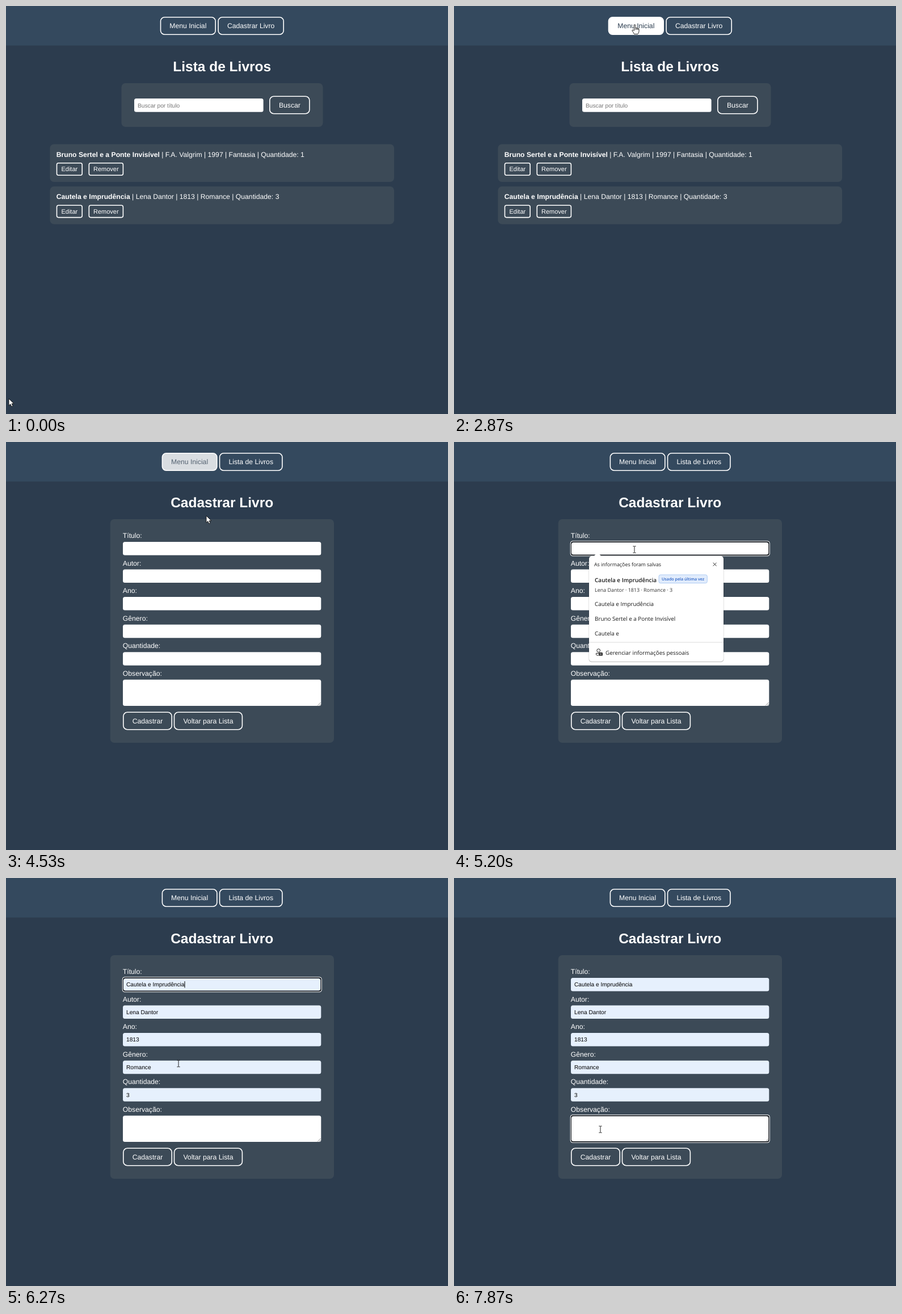
Animation of 779 by 719 pixels, one loop 8 s. Source, as an HTML page:

```html
<!DOCTYPE html>
<html lang="pt-BR">
<head>
<meta charset="utf-8">
<title>Lista de Livros</title>
<style>
html, body { margin: 0; width: 100%; height: 100%; overflow: hidden; background: #2c3c4e; }
svg { display: block; width: 779px; height: 719px; }
text { font-family: Arial, "Liberation Sans", sans-serif; text-rendering: geometricPrecision; white-space: pre; }
.ui { font-family: "Open Sans", "Noto Sans", sans-serif; }
</style>
</head>
<body>
<svg id="stage" viewBox="0 0 779 719"></svg>
<script>
const LOOP = 8000, FPS = 15;
const PAGE = '#2c3c4e', NAV = '#34495e', CARD = '#3c4a57', FILLED = '#e6f0fd';
const HOME_AT = 2933, FORM_AT = 4067, FOCUS_AT = 5000, POPUP_AT = 5130, PREVIEW_AT = 5530,
      PICK_AT = 6066, NOTE_AT = 7330, CARET_OFF = 7860;

const books = [
  { title: 'Bruno Sertel e a Ponte Invisível', author: 'F.A. Valgrim', year: 1997, genre: 'Fantasia', count: 1 },
  { title: 'Cautela e Imprudência', author: 'Lena Dantor', year: 1813, genre: 'Romance', count: 3 }
];
const pick = books[1];

// Pointer path: time, x, y
const path = [
  [0, 5, 692], [66, 5, 692], [866, 315, 21], [1150, 315, 21], [1333, 319, 33],
  [3130, 319, 33], [3600, 337, 91], [3670, 339, 90], [3930, 352, 38], [4330, 353, 38],
  [4533, 353, 130], [4930, 318, 188], [5330, 318, 190], [5730, 303.5, 252], [6066, 303.5, 252],
  [6267, 304, 327], [6670, 306, 490], [6870, 306, 490], [7300, 258, 443], [8000, 258, 443]
];

const clamp = v => Math.max(0, Math.min(1, v));
const smooth = v => (v = clamp(v)) * v * (3 - 2 * v);
const hover = (t, on, off) => Math.min(smooth((t - on) / 300), 1 - smooth((t - off) / 300));

function pointerAt(t) {
  const i = Math.max(1, path.findIndex(p => p[0] >= t));
  const [t0, x0, y0] = path[i - 1], [t1, x1, y1] = path[i];
  const k = smooth((t - t0) / (t1 - t0));
  return [x0 + (x1 - x0) * k, y0 + (y1 - y0) * k];
}

const box = (x, y, w, h, r, fill, extra = '') =>
  `<rect x="${x}" y="${y}" width="${w}" height="${h}" rx="${r}" fill="${fill}" ${extra}/>`;
const label = (x, y, size, str, fill = '#fff', extra = '') =>
  `<text x="${x}" y="${y}" font-size="${size}" fill="${fill}" ${extra}>${str}</text>`;
const ui = (x, y, size, str, fill = '#1b1b1b', extra = '') => label(x, y, size, str, fill, 'class="ui" ' + extra);
const centered = (y, size, str, extra = '') => label(380.7, y, size, str, '#fff', 'text-anchor="middle" ' + extra);
const heading = str => centered(114.7, 24.5, str, 'font-weight="700"');

function button(x, y, w, h, str, lit = 0, size = 12.2, r = 7) {
  const ink = [44, 62, 80].map(c => 255 + (c - 255) * lit);
  return box(x + .8, y + .8, w - 1.6, h - 1.6, r, '#fff', `fill-opacity="${lit}" stroke="#fff" stroke-width="1.6"`) +
    label(x + w / 2, y + h / 2 + size * .34, size, str, `rgb(${ink})`, 'text-anchor="middle"');
}
const navButton = (x, w, str, lit) => button(x, 19, w, 32, str, lit);

function field(y, h, fill, focused) {
  const ring = focused
    ? box(204.8, y - 1.7, 352, h + 3.4, 4.5, '#fff') + box(205.8, y - .7, 350, h + 1.4, 4, '#10151b')
    : '';
  const inset = focused ? 1 : 0;
  return ring + box(206 + inset, y + inset, 349.3 - 2 * inset, h - 2 * inset, 3.5, fill);
}

function listPage(t) {
  const rows = books.map((b, i) => {
    const y = 243.5 + 74.4 * i;
    return box(77.5, y, 606.5, 66.5, 7, CARD) +
      label(88.7, y + 22, 12.2, `<tspan font-weight="700">${b.title}</tspan> | ${b.author} | ${b.year} | ${b.genre} | Quantidade: ${b.count}`) +
      button(88.7, y + 32.5, 46.3, 23, 'Editar', 0, 11, 3) +
      button(145.5, y + 32.5, 61.7, 23, 'Remover', 0, 11, 3);
  });
  return navButton(271.7, 98.3, 'Menu Inicial', hover(t, 630, 1e5)) + navButton(373.3, 116.7, 'Cadastrar Livro') +
    heading('Lista de Livros') + box(203.5, 136, 355, 77, 7, CARD) + box(226, 163, 227.6, 23.7, 3.5, '#fff') +
    label(232, 178.5, 10.2, 'Buscar por título', '#757575') + button(464, 158.5, 71.7, 32, 'Buscar') + rows.join('');
}

function homePage(t) {
  const lit = Math.max(hover(t, HOME_AT, 3350), hover(t, 3800, 1e5));
  return navButton(214.5, 98.3, 'Menu Inicial') + navButton(315.7, 116.7, 'Cadastrar Livro', lit) +
    navButton(435, 112, 'Lista de Livros') + heading('Bem-vindo à Biblioteca') +
    centered(146.4, 12.2, 'Escolha uma opção no menu acima.');
}

function popup(t) {
  const hovered = t >= PREVIEW_AT;
  return `<g opacity="${clamp((t - POPUP_AT + 70) / 140)}">` +
    box(237.5, 201, 238, 187, 5, '#000', 'opacity=".22"') + box(238, 201, 237, 185.7, 5, '#fff') +
    '<path d="M246 201.5L253 194.7L260 201.5Z" fill="#fff"/>' +
    ui(247, 219, 8.85, 'As informações foram salvas') +
    '<path d="M456.7 212.7l5.8 5.8m0-5.8l-5.8 5.8" stroke="#222" stroke-width="1"/>' +
    (hovered ? box(242, 228, 233, 44.3, 3, '#f4f4f4') : '') +
    ui(248, 247, 10, pick.title, '#1b1b1b', 'font-weight="600"') +
    box(361, 234, 85.3, 14.7, 3, '#e1ecfc', 'stroke="#a9c8f3" stroke-width=".9"') +
    ui(403.6, 244.2, 7.1, 'Usado pela última vez', '#2b63c6', 'font-weight="600" text-anchor="middle"') +
    ui(248, 264, 8.95, `${pick.author} · ${pick.year} · ${pick.genre} · ${pick.count}`, '#333') +
    [pick.title, books[0].title, 'Cautela e'].map((s, i) => ui(248, 289.2 + 25.8 * i, 9.9, s)).join('') +
    box(238, 352.5, 237, 1, 0, '#dcdcdc') +
    '<g fill="none" stroke="#222"><circle cx="254.7" cy="367.5" r="2.9"/><path d="M255 372.3h-4.5q-.8 4 4 4"/></g>' +
    box(255, 371, 7, 5.6, 1.2, '#222') + box(256.5, 373.2, 4, 1, 0, '#fff') +
    ui(267, 375, 9.9, 'Gerenciar informações pessoais') + '</g>';
}

function formPage(t) {
  const names = ['Título', 'Autor', 'Ano', 'Gênero', 'Quantidade', 'Observação'];
  const values = [pick.title, pick.author, pick.year, pick.genre, pick.count];
  const filled = t >= PREVIEW_AT, onTitle = t >= FOCUS_AT && t < NOTE_AT - 40, onNote = t >= NOTE_AT - 40;
  const caret = (x, y) => box(x, y, 1, 11.5, 0, '#000');
  let out = navButton(274.6, 98, 'Menu Inicial', hover(t, FORM_AT, 4450)) + navButton(375.7, 112, 'Lista de Livros') +
    heading('Cadastrar Livro') + box(183.7, 136, 394.3, 394, 7, CARD);
  names.forEach((name, i) => {
    const y = 176 + 48.55 * i, note = i === 5;
    out += label(205.8, y - 6.9, 12.2, name + ':') +
      field(y, note ? 46.3 : 23.5, filled && !note ? FILLED : '#fff', note ? onNote : onTitle && !i);
    if (filled && !note) out += label(212, y + 15.3, 10.2, values[i], '#000');
  });
  out += '<path d="M549 464.5l5.5-5.5m-2.5 5.5l2.5-2.5" stroke="#777" stroke-width=".8"/>' +
    button(206, 475.5, 87, 32, 'Cadastrar') + button(295.7, 475.5, 121.5, 32, 'Voltar para Lista', hover(t, 6600, 6980));
  if (t >= PICK_AT && t < 6600) out += caret(314.5, 182);
  if (t >= NOTE_AT && t < CARET_OFF) out += caret(212, 425);
  if (t >= POPUP_AT && t < PICK_AT) out += popup(t);
  return out;
}

const cursors = {
  arrow: '<path d="M0 0V12.2L2.8 9.6L4.8 14L7 13L5.1 8.8H9Z" fill="#fff" stroke="#111" stroke-width=".9"/>',
  hand: '<path d="M-1.5 10V1.2Q-1.5 0 -.2 0T1 1.2V5.6Q2.4 4.9 3.2 6Q4.6 5.4 5.2 6.7Q7 6.3 7 8V11.5Q7 14 5 16.5H-1.5Q-2.3 13.7 -5 10.8Q-5.5 9.4 -4 9.1Q-3 9 -1.5 11M1 5.6V9M3.2 6V9M5.2 6.7V9" fill="#fff" stroke="#111" stroke-width=".9" stroke-linejoin="round"/>',
  beam: '<path d="M-2.6 -5.8H-.7L0 -5.2L.7 -5.8H2.6M0 -5.2V5.2M-2.6 5.8H-.7L0 5.2L.7 5.8H2.6" fill="none" stroke="#222" stroke-width="1"/>'
};

function cursorKind(t, y) {
  if (t < HOME_AT) return t >= 630 ? 'hand' : 'arrow';
  if (y > 19 && y < 51) return 'hand';
  if (t < FORM_AT) return 'arrow';
  if (t >= POPUP_AT && t < PICK_AT && y > 200) return 'arrow';
  if (y > 475) return 'hand';
  if (y > 418 && y < 465) return 'beam';
  const slot = (y - 176) / 48.55;
  return slot > 0 && slot < 5 && slot % 1 < .49 ? 'beam' : 'arrow';
}

const stage = document.getElementById('stage');
let shown = -1;
function draw(now) {
  const tick = Math.floor((now % LOOP + 5) * FPS / 1000);
  if (tick !== shown) {
    shown = tick;
    const t = Math.min(LOOP, tick * 1000 / FPS);
    const page = t < HOME_AT ? listPage : t < FORM_AT ? homePage : formPage;
    const [x, y] = pointerAt(t);
    stage.innerHTML = box(0, 0, 779, 719, 0, PAGE) + box(0, 0, 779, 69.6, 0, NAV) + page(t) +
      `<g transform="translate(${x} ${y})">${cursors[cursorKind(t, y)]}</g>`;
  }
  requestAnimationFrame(() => draw(performance.now()));
}
draw(performance.now());
</script>
</body>
</html>
```
